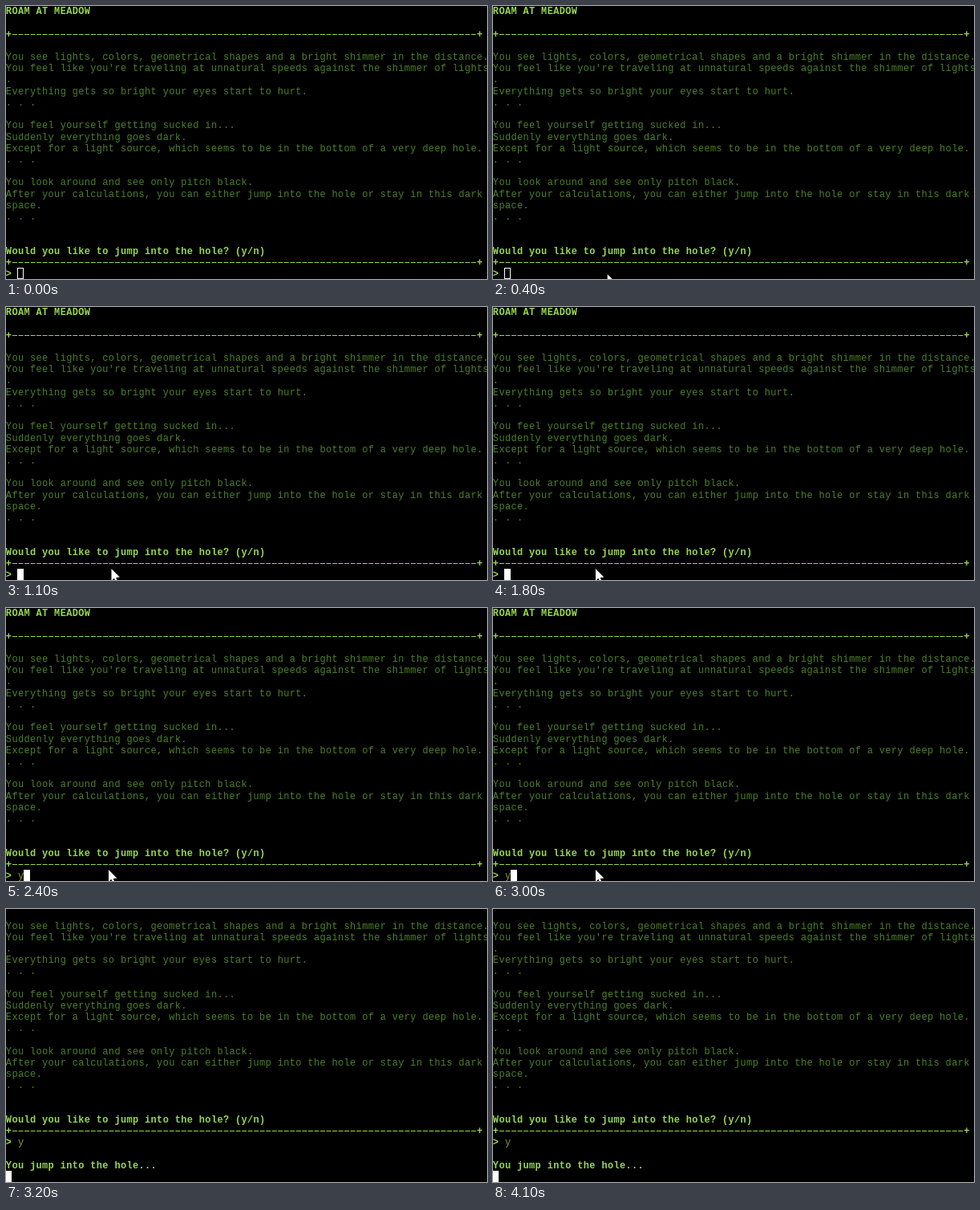
These frames come from a looping animation (600x340 px, 4200 ms). An HTML page with a canvas:

```html
<!DOCTYPE html>
<html lang="en">
<head>
<meta charset="utf-8">
<title>Text adventure</title>
<style>
  html, body { margin: 0; width: 100%; height: 100%; overflow: hidden; background: #000; }
  canvas { display: block; }
</style>
</head>
<body>
<canvas id="stage" width="600" height="340"></canvas>
<script>
const ctx = document.getElementById('stage').getContext('2d');
const LOOP = 4200, STEP = 100;
const CELL_W = 7.53, CELL_H = 14.2, LAST_ROW = 23;
const DIM = '#4c8029', BRIGHT = '#98d84c', TYPED = '#8a9c34', WHITE = '#fff';
const SIZE = '12px "Liberation Mono", monospace';

const RULE = '+' + '-'.repeat(77) + '+';
const INTRO = [
  '*ROAM AT MEADOW',
  '',
  '*' + RULE,
  '',
  'You see lights, colors, geometrical shapes and a bright shimmer in the distance.',
  "You feel like you're traveling at unnatural speeds against the shimmer of lights",
  '.',
  'Everything gets so bright your eyes start to hurt.',
  '. . .',
  '',
  'You feel yourself getting sucked in...',
  'Suddenly everything goes dark.',
  'Except for a light source, which seems to be in the bottom of a very deep hole.',
  '. . .',
  '',
  'You look around and see only pitch black.',
  'After your calculations, you can either jump into the hole or stay in this dark',
  'space.',
  '. . .',
  '',
  '',
  '*Would you like to jump into the hole? (y/n)',
  '*' + RULE
];
const REPLY = 'You jump into the hole...';

// Each character sits in its own terminal cell; dashes are wide, thin bars.
function write(text, row, col, color, bold) {
  ctx.font = (bold ? 'bold ' : '') + SIZE;
  ctx.textAlign = 'center';
  ctx.fillStyle = color;
  const y = Math.round(row * CELL_H + 10.3);
  [...text].forEach((ch, i) => {
    const x = (col + i + 0.5) * CELL_W - 0.3;
    if (ch === '-') ctx.fillRect(x - 3, y - 4, 6, 1);
    else if (ch !== ' ') ctx.fillText(ch, x, y);
  });
}

function drawCaret(col, solid) {
  const x = Math.max(0, Math.round(col * CELL_W - 0.6));
  if (solid) {
    ctx.fillStyle = WHITE;
    ctx.fillRect(x, 326, col ? 8 : 7, 14);
  } else {
    ctx.strokeStyle = WHITE;
    ctx.lineWidth = 1;
    ctx.strokeRect(x + 0.5, 326.5, 7, 13);
  }
}

function drawPointer({ x, y }) {
  const outline = [[0, 0], [0, 15], [3.4, 11.8], [5.8, 17], [8, 16], [5.7, 11], [10.4, 10.6]];
  ctx.beginPath();
  outline.forEach(([dx, dy]) => ctx.lineTo(x + dx, y + dy));
  ctx.closePath();
  ctx.lineWidth = 1.5;
  ctx.strokeStyle = '#000';
  ctx.stroke();
  ctx.fillStyle = WHITE;
  ctx.fill();
}

function pointerAt(t) {
  if (t < 300 || t >= 3200) return null;
  if (t >= 3100) return { x: 139.5, y: 331.5 };
  if (t >= 1300) return { x: 128, y: 326 };
  const p = Math.min(1, (t - 300) / 400);
  const rest = (1 - p) ** 2;
  return { x: 131.5 + 20 * rest, y: 326 + 14 * rest };
}

function draw(t) {
  const scroll = t < 3100 ? 0 : t < 3200 ? 2 : 3;
  const typed = t >= 2000 ? 'y' : '';
  const reply = t < 3100 ? '' : t < 3200 ? REPLY.slice(0, 15) : REPLY;

  ctx.fillStyle = '#000';
  ctx.fillRect(0, 0, 600, 340);
  INTRO.forEach((line, i) => {
    const bold = line[0] === '*';
    if (i >= scroll) write(bold ? line.slice(1) : line, i - scroll, 0, bold ? BRIGHT : DIM, bold);
  });
  write('>', LAST_ROW - scroll, 0, BRIGHT, true);
  write(typed, LAST_ROW - scroll, 2, TYPED, false);
  write(reply, LAST_ROW + 2 - scroll, 0, BRIGHT, true);

  const col = scroll === 0 ? 2 + typed.length : scroll === 2 ? reply.length : 0;
  drawCaret(col, t >= 1000);
  const pointer = pointerAt(t);
  if (pointer) drawPointer(pointer);
}

const start = performance.now();
function tick() {
  const t = (performance.now() - start) % LOOP;
  draw(Math.floor(t / STEP) * STEP);
  requestAnimationFrame(tick);
}
tick();
</script>
</body>
</html>
```
